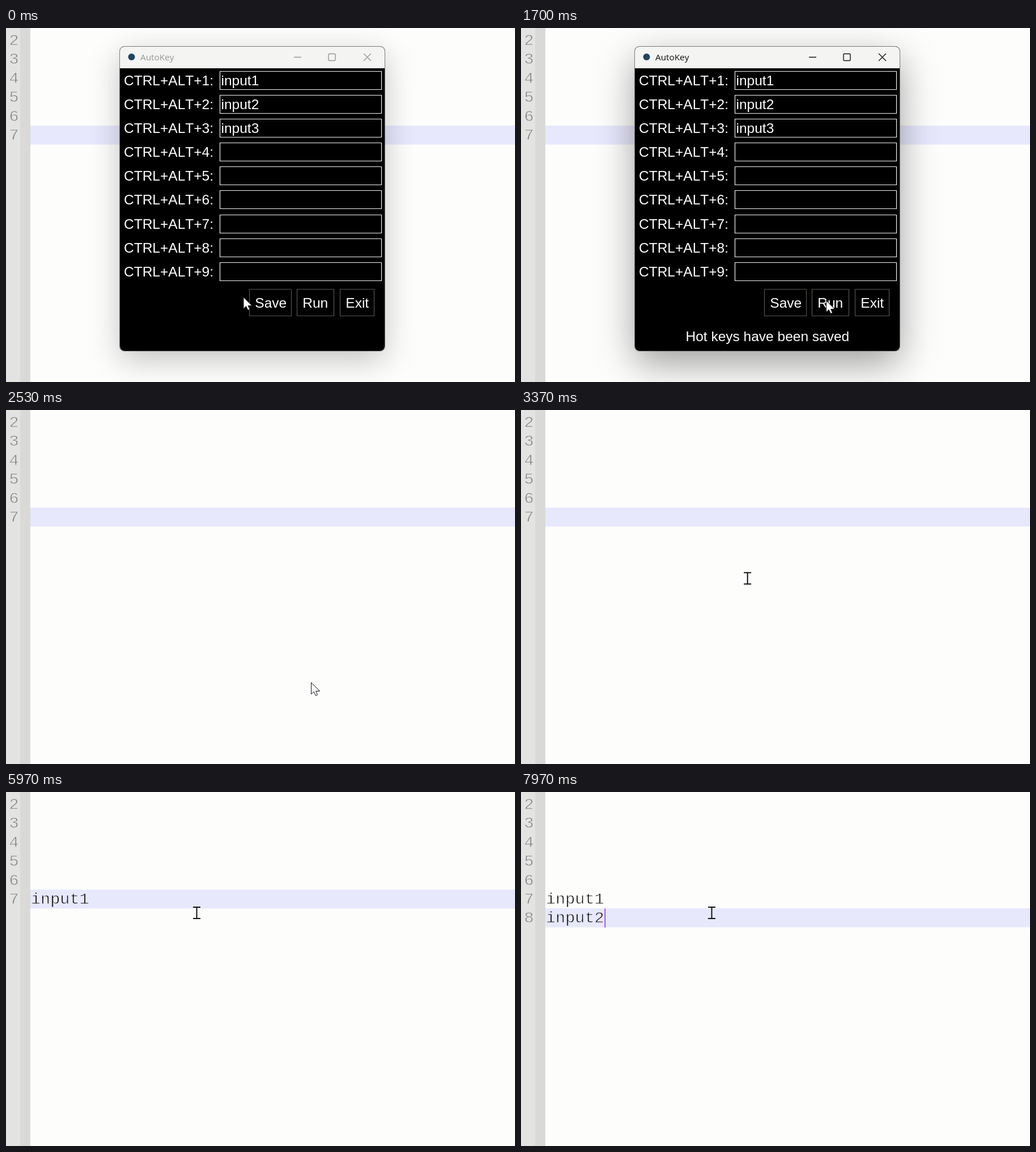
Animation of 898x624 px, one loop 8 s. Source, as an HTML page with a canvas:

```html
<!DOCTYPE html>
<html lang="en">
<head>
<meta charset="utf-8">
<title>Hot key demo</title>
<style>
  html, body { margin: 0; width: 100%; height: 100%; overflow: hidden; background: #fdfdfc; }
  canvas { display: block; }
</style>
</head>
<body>
<canvas id="stage" width="898" height="624"></canvas>
<script>
const ctx = document.getElementById('stage').getContext('2d');
const LOOP = 8000;
const SANS = '24.5px "Liberation Sans", Arial, sans-serif';
const MONO = '28.5px "Liberation Mono", "Courier New", monospace';
const TITLE = '15.3px "Open Sans", sans-serif';
const LINE_HEIGHT = 33.4;
const PAPER = '#fdfdfc', CURRENT_LINE = '#e8e8fd', GUTTER = '#e3e3e2';

// Moments of the story in ms
const SAVE_PRESS = 550, SAVE_RELEASE = 720, RUN_PRESS = 2380, WINDOW_CLOSED = 2515;
const POINTER_LEAVES = 2700, EDITOR_CLICK = 4200;
const FIRST_PASTE = 5250, NEW_LINE = 6350, SECOND_PASTE = 7650;
const BLINK = 530;

const POINTER = [
  { t: 0, x: 418.5, y: 474 },
  { t: 420, x: 456, y: 478 },
  { t: 1000, x: 456, y: 478 },
  { t: 1560, x: 538, y: 480 },
  { t: POINTER_LEAVES, x: 538, y: 480 },
  { t: 3770, x: 336.5, y: 213 },
];

const smooth = v => v * v * (3 - 2 * v);
const between = (t, from, to) => t >= from && t < to;

function pointerAt(t) {
  const next = POINTER.findIndex(p => p.t > t);
  if (next < 0) return POINTER[POINTER.length - 1];
  const a = POINTER[next - 1], b = POINTER[next];
  const k = smooth((t - a.t) / (b.t - a.t));
  return { x: a.x + (b.x - a.x) * k, y: a.y + (b.y - a.y) * k };
}

function rect(x, y, w, h, color) {
  ctx.fillStyle = color;
  ctx.fillRect(x, y, w, h);
}

function frame(x, y, w, h, color) {
  ctx.strokeStyle = color;
  ctx.lineWidth = 1.2;
  ctx.strokeRect(x + .5, y + .5, w - 1, h - 1);
}

function text(str, x, y, font, color) {
  ctx.font = font;
  ctx.fillStyle = color;
  ctx.fillText(str, x, y);
}

// Light typewriter look: the outline is trimmed with the background colour
function thinText(str, x, y, color, background) {
  text(str, x, y, MONO, color);
  ctx.strokeStyle = background;
  ctx.lineWidth = .8;
  ctx.lineJoin = 'round';
  ctx.strokeText(str, x, y);
}

function drawEditor(t) {
  const row = t >= NEW_LINE ? 1 : 0;
  const baseline = n => 30 + (n - 2) * LINE_HEIGHT;
  rect(0, 0, 898, 624, PAPER);
  rect(0, 0, 25, 624, GUTTER);
  rect(25, 0, 18, 624, '#d9d9d8');
  rect(43, 172 + Math.round(row * LINE_HEIGHT), 855, 33.5, CURRENT_LINE);

  for (let n = 2; n <= 7 + row; n++) thinText(n, 5.5, baseline(n), '#808080', GUTTER);
  if (t >= FIRST_PASTE) thinText('input1', 44, baseline(7), '#111', row ? PAPER : CURRENT_LINE);
  if (t >= SECOND_PASTE) thinText('input2', 44, baseline(8), '#111', CURRENT_LINE);

  // The caret restarts its blink after each action
  const last = [SECOND_PASTE, NEW_LINE, FIRST_PASTE, EDITOR_CLICK].find(m => t >= m);
  if (last !== undefined && Math.floor((t - last) / BLINK) % 2 === 0) {
    const atEnd = last === FIRST_PASTE || last === SECOND_PASTE;
    rect(atEnd ? 147.5 : 43, 172 + row * LINE_HEIGHT, atEnd ? 1.6 : 1, 33.4,
      atEnd ? '#9a32dc' : '#1c1640');
  }
}

function drawButton(label, x, w, pressed) {
  const shift = pressed ? 1 : 0;
  if (pressed) rect(x, 460, w + 1, 49, '#f1f1f1');
  else frame(x, 460, w, 48, '#55554f');
  text(label, x + 10.3 + shift, 493 + shift, SANS, pressed ? '#111' : '#fff');
}

function drawTitleBar(active) {
  const color = active ? '#111' : '#969696';
  rect(201, 33, 467, 38, '#f4f4f3');
  ctx.fillStyle = '#24445f';
  ctx.beginPath();
  ctx.arc(221.5, 51, 6, 0, Math.PI * 2);
  ctx.fill();
  text('AutoKey', 237, 57, TITLE, color);

  ctx.strokeStyle = color;
  ctx.lineWidth = 1.4;
  ctx.beginPath();
  ctx.moveTo(508, 51.5); ctx.lineTo(521, 51.5);
  ctx.moveTo(631, 45); ctx.lineTo(644, 58);
  ctx.moveTo(644, 45); ctx.lineTo(631, 58);
  ctx.roundRect(569, 45.5, 12, 12, 1.5);
  ctx.stroke();
}

function drawWindow(t) {
  const active = t >= SAVE_PRESS;
  ctx.beginPath();
  ctx.roundRect(201, 33, 467, 536, 8);
  ctx.save();
  ctx.shadowColor = active ? 'rgba(0,0,0,.38)' : 'rgba(0,0,0,.24)';
  ctx.shadowBlur = active ? 66 : 54;
  ctx.shadowOffsetY = active ? 22 : 15;
  ctx.fillStyle = '#000';
  ctx.fill();
  ctx.restore();

  ctx.save();
  ctx.clip();
  drawTitleBar(active);
  ctx.restore();
  ctx.strokeStyle = 'rgba(75,75,75,.7)';
  ctx.lineWidth = 1;
  ctx.beginPath();
  ctx.roundRect(200.5, 32.5, 468, 537, 8);
  ctx.stroke();

  for (let i = 0; i < 9; i++) {
    const y = Math.round(75.9 + i * 42.11);
    text(`CTRL+ALT+${i + 1}:`, 208, y + 25, SANS, '#fff');
    frame(377, y, 286, 33, '#f4f4f4');
    if (i < 3) text(`input${i + 1}`, 379.5, y + 25, SANS, '#fff');
  }
  drawButton('Save', 429, 75, between(t, SAVE_PRESS, SAVE_RELEASE));
  drawButton('Run', 513, 66, between(t, RUN_PRESS, WINDOW_CLOSED));
  drawButton('Exit', 589, 61, false);
  if (t >= SAVE_RELEASE) text('Hot keys have been saved', 290.5, 552, SANS, '#fff');
}

function drawArrow() {
  ctx.beginPath();
  [[.5, .5], [.5, 21], [5, 16.5], [8.5, 23.5], [11.5, 22], [8.5, 15.5], [15.5, 15.5]]
    .forEach(([x, y]) => ctx.lineTo(x, y));
  ctx.closePath();
  ctx.fillStyle = '#fff';
  ctx.fill();
  ctx.strokeStyle = '#111';
  ctx.lineWidth = 1;
  ctx.stroke();
}

function drawTextCursor() {
  rect(-1, -10, 2, 20, '#111');
  for (const edge of [-11, 9]) rect(-6.5, edge, 13, 2, '#111');
}

function drawPointer(t) {
  const { x, y } = pointerAt(t);
  ctx.save();
  ctx.translate(x, y);
  if (t <= POINTER_LEAVES) drawArrow();
  else drawTextCursor();
  ctx.restore();
}

function render(t) {
  ctx.fontKerning = 'none';
  drawEditor(t);
  if (t < WINDOW_CLOSED) drawWindow(t);
  drawPointer(t);
}

const start = performance.now();
function tick() {
  render((performance.now() - start) % LOOP);
  requestAnimationFrame(tick);
}
tick();
</script>
</body>
</html>
```
